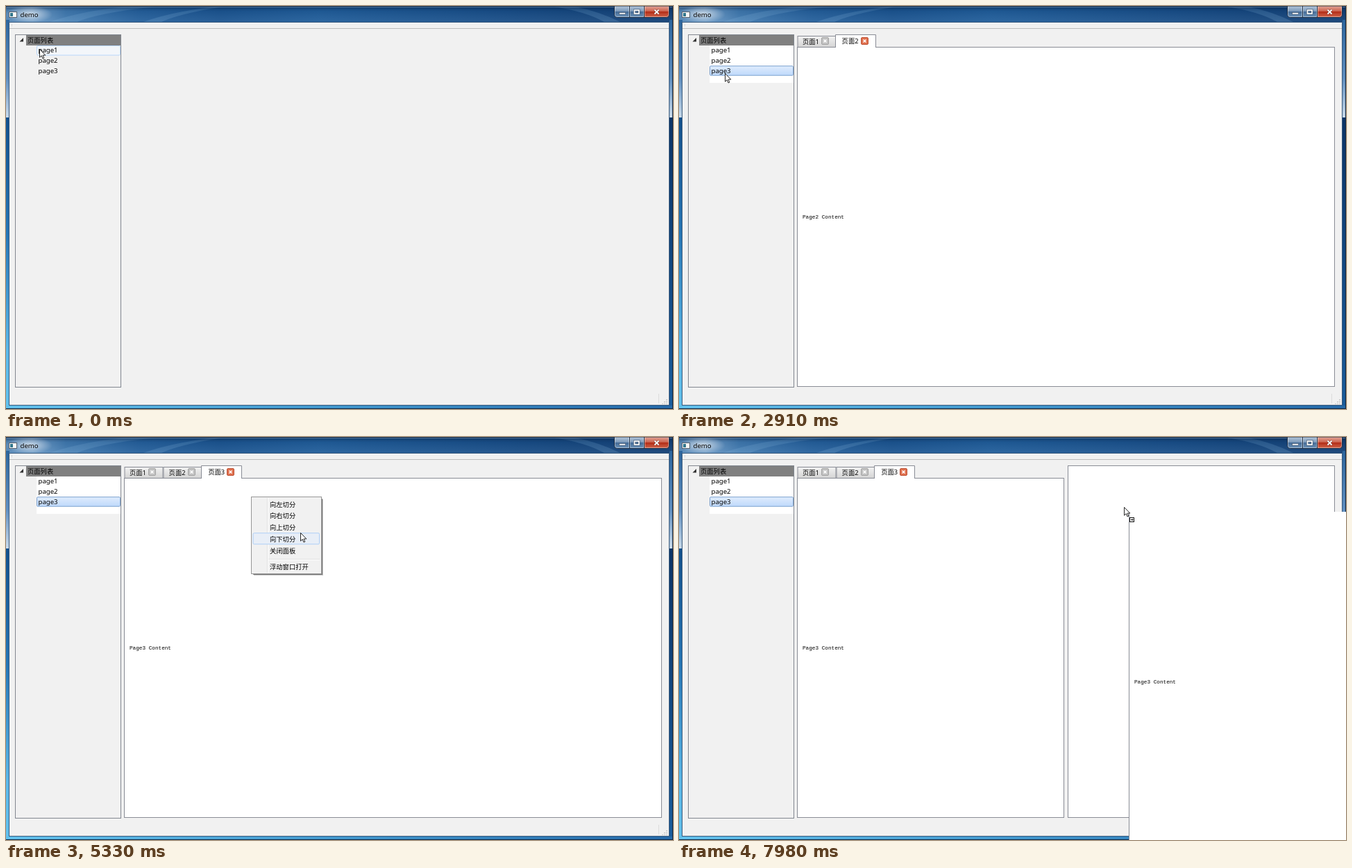
Write an HTML page that moves like this. It is 961 px wide and 582 px high and loops after 8 s.

```html
<!DOCTYPE html>
<html lang="zh">
<head>
<meta charset="utf-8">
<title>demo</title>
<style>
html, body { margin: 0; width: 100%; height: 100%; overflow: hidden; background: #f0f0f0; }
svg { display: block; width: 100%; height: 100%; }
text { font: 9.3px "Noto Sans", "Noto Sans CJK SC", "Noto Sans CJK", sans-serif; fill: #000; white-space: pre; }
.latin { font-size: 9.6px; }
.content { font: 7.7px "Liberation Mono", monospace; }
.frame { fill: #fff; stroke: #898c95; }
.hidden { display: none; }
</style>
</head>
<body>
<svg id="stage" viewBox="0 0 961 582" xmlns="http://www.w3.org/2000/svg">
  <defs>
    <linearGradient id="title">
      <stop offset="0" stop-color="#5285b5"/><stop offset=".04" stop-color="#6e9bc6"/>
      <stop offset=".09" stop-color="#3f78ae"/><stop offset=".2" stop-color="#245f9b"/>
      <stop offset=".32" stop-color="#1b5490"/><stop offset=".47" stop-color="#205d9a"/>
      <stop offset=".75" stop-color="#184d87"/><stop offset="1" stop-color="#123f74"/>
    </linearGradient>
    <linearGradient id="shade" x2="0" y2="1">
      <stop offset="0" stop-color="#061b38" stop-opacity=".5"/><stop offset=".3" stop-color="#061b38" stop-opacity=".08"/>
      <stop offset="1" stop-color="#fff" stop-opacity=".06"/>
    </linearGradient>
    <radialGradient id="glow">
      <stop offset="0" stop-color="#fff" stop-opacity=".65"/><stop offset="1" stop-color="#fff" stop-opacity="0"/>
    </radialGradient>
    <linearGradient id="edgeTop" x2="0" y2="1">
      <stop offset="0" stop-color="#2c659d"/><stop offset=".6" stop-color="#5f8fc0"/><stop offset="1" stop-color="#c9daea"/>
    </linearGradient>
    <linearGradient id="edgeLeft" x2="0" y2="1">
      <stop offset="0" stop-color="#12508c"/><stop offset=".4" stop-color="#2676b5"/>
      <stop offset=".8" stop-color="#5bb8e8"/><stop offset="1" stop-color="#62c1ec"/>
    </linearGradient>
    <linearGradient id="edgeRight" x2="0" y2="1">
      <stop offset="0" stop-color="#0b3467"/><stop offset="1" stop-color="#1a5d9c"/>
    </linearGradient>
    <linearGradient id="edgeBottom">
      <stop offset="0" stop-color="#62c1ec"/><stop offset=".5" stop-color="#4197cd"/><stop offset="1" stop-color="#2569a8"/>
    </linearGradient>
    <linearGradient id="button" x2="0" y2="1">
      <stop offset="0" stop-color="#b4c6da"/><stop offset=".45" stop-color="#7d9aba"/>
      <stop offset=".5" stop-color="#436a96"/><stop offset="1" stop-color="#6e94ba"/>
    </linearGradient>
    <linearGradient id="closeButton" x2="0" y2="1">
      <stop offset="0" stop-color="#e3a698"/><stop offset=".45" stop-color="#cc6450"/>
      <stop offset=".5" stop-color="#b32d17"/><stop offset="1" stop-color="#d0664c"/>
    </linearGradient>
    <linearGradient id="selected" x2="0" y2="1"><stop stop-color="#dfecfd"/><stop offset="1" stop-color="#bfd9fb"/></linearGradient>
    <linearGradient id="tab" x2="0" y2="1"><stop stop-color="#f2f2f2"/><stop offset="1" stop-color="#d4d4d4"/></linearGradient>
  </defs>

  <!-- window frame -->
  <rect width="961" height="582" fill="#1b5490"/>
  <rect width="961" height="24" fill="url(#title)"/>
  <path d="M60 24Q105 8 170 1H215Q130 10 100 24ZM195 24Q235 9 300 1H312Q245 12 222 24ZM790 1Q835 8 862 23H885Q855 8 820 1Z" fill="#7fb0dc" opacity=".22"/>
  <rect width="961" height="24" fill="url(#shade)"/>
  <ellipse cx="33" cy="12" rx="34" ry="12" fill="url(#glow)"/>
  <rect y="20" width="5" height="141" fill="url(#edgeTop)"/>
  <rect x="956" y="20" width="5" height="141" fill="url(#edgeTop)"/>
  <rect y="161" width="5" height="421" fill="url(#edgeLeft)"/>
  <rect x="956" y="161" width="5" height="421" fill="url(#edgeRight)"/>
  <rect y="577" width="961" height="5" fill="url(#edgeBottom)"/>
  <path d="M0 .5H961M960.5 0V582M0 581.5H961" stroke="#10253f" fill="none"/>
  <path d="M1 1.5H960" stroke="#9cbad8" opacity=".45"/>
  <rect x="4.5" y="23.5" width="951" height="553" fill="#f1f1f1" stroke="#39597b"/>
  <path d="M5 24.5H955" stroke="#fff"/>
  <path d="M5 32.5H955" stroke="#bcbcbc"/>
  <path d="M8.5 26V30" stroke="#c4c4c4" stroke-dasharray="1 1"/>
  <path d="M940.5 560V574" stroke="#dcdcdc"/>
  <path d="M952 568V575M949 571V575M946 574V575" stroke="#bbb" stroke-width="1.5" stroke-dasharray="1.5 1.5"/>
  <rect x="4.5" y="8.5" width="11" height="8" fill="#f8f8f8" stroke="#55616e"/>
  <rect x="6" y="10" width="4" height="5" fill="#34778c"/>
  <text class="latin" x="20.5" y="15.5">demo</text>

  <g stroke="#1d2e45">
    <path d="M876.5 0H898.5V16.5H880.5Q876.5 16.5 876.5 12.5Z" fill="url(#button)"/>
    <path d="M898.5 0H919.5V16.5H898.5Z" fill="url(#button)"/>
    <path d="M919.5 0H955.5V12.5Q955.5 16.5 951.5 16.5H919.5Z" fill="url(#closeButton)"/>
  </g>
  <path d="M877.5 1V12.5Q877.5 15.5 880.5 15.5H897.5V1M899.5 1V15.5H918.5V1M920.5 1V15.5H951.5Q954.5 15.5 954.5 12.5V1" fill="none" stroke="#fff" opacity=".4"/>
  <rect x="883.5" y="9.5" width="9" height="2.5" fill="#fff" stroke="#46586e" stroke-width=".7"/>
  <rect x="905.5" y="6" width="6.5" height="5" fill="none" stroke="#46586e" stroke-width="3"/>
  <rect x="905.5" y="6" width="6.5" height="5" fill="none" stroke="#fff" stroke-width="1.7"/>
  <path d="M934.5 5.5L940.5 11.5M940.5 5.5L934.5 11.5" stroke="#6b342d" stroke-width="3"/>
  <path d="M934.5 5.5L940.5 11.5M940.5 5.5L934.5 11.5" stroke="#fff" stroke-width="1.8"/>

  <!-- page tree -->
  <rect x="13.5" y="41.5" width="152" height="509" fill="#f1f1f1" stroke="#828790"/>
  <rect x="29" y="42" width="136" height="15" fill="#808080"/>
  <path d="M25 46V51.5H19.5Z" fill="#333"/>
  <text x="31" y="52.5">页面列表</text>
  <rect id="repaint" x="44" y="57" width="121" height="0" fill="#fff"/>
  <rect id="hover" x="44.5" width="120" height="13.5" rx="1.5" fill="#f3f6fa" stroke="#b8d6fb"/>
  <rect id="selection" x="44.5" width="120" height="13.5" rx="1.5" fill="url(#selected)" stroke="#7da2ce"/>
  <g id="rows"></g>

  <!-- tabbed pane -->
  <g id="pane">
    <rect id="body" class="frame" x="170.5" y="59.5" width="774" height="490"/>
    <g id="tabs"></g>
    <text id="content" class="content" x="178" y="307"></text>
  </g>
  <rect id="side" class="frame" x="560.5" y="41.5" width="384" height="508"/>

  <!-- context menu -->
  <g id="menu">
    <rect x="357" y="90" width="100" height="110" fill="#000" opacity=".22"/>
    <rect x="356" y="89" width="100" height="110" fill="#000" opacity=".4"/>
    <rect x="353.5" y="86.5" width="101" height="111" fill="#f1f1f1" stroke="#979797"/>
    <path d="M376.5 88V196M377 176.5H452" stroke="#e0e0e0"/>
    <path d="M377.5 88V196M377 177.5H452" stroke="#fff"/>
    <rect id="choice" x="356" width="95.5" height="16" rx="1.5" fill="#e8eef7" stroke="#aecff7"/>
    <g id="items"></g>
  </g>

  <!-- dragged page -->
  <g id="drag">
    <rect width="387" height="491" fill="#fff"/>
    <path d="M.5 0V490.5H384.5V0" fill="none" stroke="#898c95"/>
    <text class="content" x="8" y="248">Page3 Content</text>
  </g>

  <g id="pointer">
    <path id="arrow" d="M.5 .5V12.2L3.2 9.7L5 14L6.8 13.2L5 9.1H8.8Z" fill="#fff" stroke="#111" stroke-width=".9"/>
    <g id="copy" fill="#fff" stroke="#111">
      <rect x="8.5" y="15.5" width="6" height="6"/>
      <path d="M9.8 18.5H13M11.6 17L13.1 18.5L11.6 20" fill="none" stroke-width=".9"/>
    </g>
    <g id="forbidden" fill="#fff" stroke="#c4262e" stroke-width="1.8">
      <circle cx="5.5" cy="6.3" r="5.4"/>
      <path d="M1.8 2.5L9.2 10.1"/>
    </g>
  </g>
</svg>
<script>
const LOOP = 8000;
const $ = id => document.getElementById(id);
const show = (id, on) => $(id).classList.toggle('hidden', !on);
const rowTop = i => 57.5 + 14.6 * i;
const ITEM = 16.75;

$('rows').innerHTML = [0, 1, 2].map(i =>
  `<text class="latin" x="46.5" y="${67.3 + 14.6 * i}">page${i + 1}</text>`).join('');

$('items').innerHTML = ['向左切分', '向右切分', '向上切分', '向下切分', '关闭面板', '浮动窗口打开'].map((label, i) =>
  `<text x="380" y="${100.5 + ITEM * i + (i > 4 ? 7 : 0)}">${label}</text>`).join('');

function tab(i, active) {
  const x = 170.5 + 56 * i, label = 178 + 56.6 * i, closeX = Math.round(label + 27) + .5;
  const shape = active
    ? `<path d="M${x - (i ? 1 : 0)} 60V41.5H${x + 56 + (i ? 1 : 0)}V60" fill="#fff" stroke="#898c95"/>`
    : `<rect x="${x + .5}" y="43.5" width="55" height="16" fill="url(#tab)" stroke="#898c95"/>`;
  return `${shape}<text x="${label}" y="${active ? 54 : 54.8}">页面${i + 1}</text>
    <rect x="${closeX}" y="45.5" width="10" height="10" rx="1.5" fill="${active ? '#e0714f' : '#c3c3c3'}" stroke="${active ? '#bd5236' : '#a3a3a3'}"/>
    <path d="M${closeX + 3} 48.5l4 4m0-4l-4 4" stroke="#fff" stroke-width="1.5"/>`;
}

// time, pointer x, pointer y, state changes
const steps = [
  [0, 48, 62, { hover: 0, selected: -1, tabs: 0, repaint: 0 }],
  [150, 52, 62],
  [580, 52, 62, { selected: 0, hover: -1 }],
  [700, 52, 62, { tabs: 1 }],
  [1850, 58, 71],
  [2000, 60, 74, { hover: 1 }],
  [2120, 60, 75, { selected: 1, hover: -1, repaint: 32 }],
  [2270, 60, 75, { tabs: 2 }],
  [2500, 62, 81],
  [2630, 64, 90, { hover: 2, repaint: 47 }],
  [2760, 66, 96],
  [2910, 66, 97, { selected: 2, hover: -1, repaint: 54 }],
  [3050, 66, 97, { tabs: 3 }],
  [3340, 150, 94],
  [3480, 290, 89],
  [3610, 354, 86],
  [3880, 391, 94, { menu: true }],
  [4020, 396, 98],
  [4140, 402, 104],
  [4270, 408, 112],
  [4400, 413, 121],
  [4530, 417, 131],
  [4660, 421, 140],
  [4780, 423, 147],
  [4930, 424, 154],
  [5060, 425, 163],
  [5200, 424, 150],
  [5330, 424, 138],
  [5480, 425, 131],
  [5600, 426, 124],
  [5750, 427, 119],
  [5880, 428, 117],
  [6430, 428, 117, { menu: false, split: true }],
  [6830, 390, 103],
  [6980, 330, 81],
  [7100, 298, 69],
  [7410, 318, 75, { drag: true }],
  [7560, 375, 80],
  [7700, 470, 88],
  [7840, 572, 96],
  [7980, 641, 101]
];
let state = {};
const poses = steps.map(([time, x, y, change]) => (state = { ...state, ...change, time, x, y }));

function mark(id, row) {
  show(id, row >= 0);
  $(id).setAttribute('y', rowTop(Math.max(row, 0)));
}

function draw(p) {
  mark('hover', p.hover);
  mark('selection', p.selected);
  $('repaint').setAttribute('height', p.repaint);
  show('pane', p.tabs > 0);
  $('body').setAttribute('width', p.split ? 384 : 774);
  $('tabs').innerHTML = Array.from({ length: p.tabs }, (_, i) => tab(i, i === p.tabs - 1)).join('');
  $('content').textContent = `Page${p.tabs} Content`;
  show('side', p.split);
  show('menu', p.menu);
  $('choice').setAttribute('y', 88.5 + ITEM * Math.max(0, Math.floor((p.y - 87.5) / ITEM)));
  const blocked = p.drag && p.x < 560;
  show('drag', p.drag);
  $('drag').setAttribute('transform', `translate(${p.x + 7} ${p.y + 7})`);
  show('arrow', !blocked);
  show('forbidden', blocked);
  show('copy', p.drag && !blocked);
  $('pointer').setAttribute('transform', `translate(${p.x} ${p.y})`);
}

let current;
function tick() {
  const time = performance.now() % LOOP;
  const pose = poses.findLast(p => p.time <= time);
  if (pose !== current) draw(current = pose);
  requestAnimationFrame(tick);
}
tick();
</script>
</body>
</html>
```
